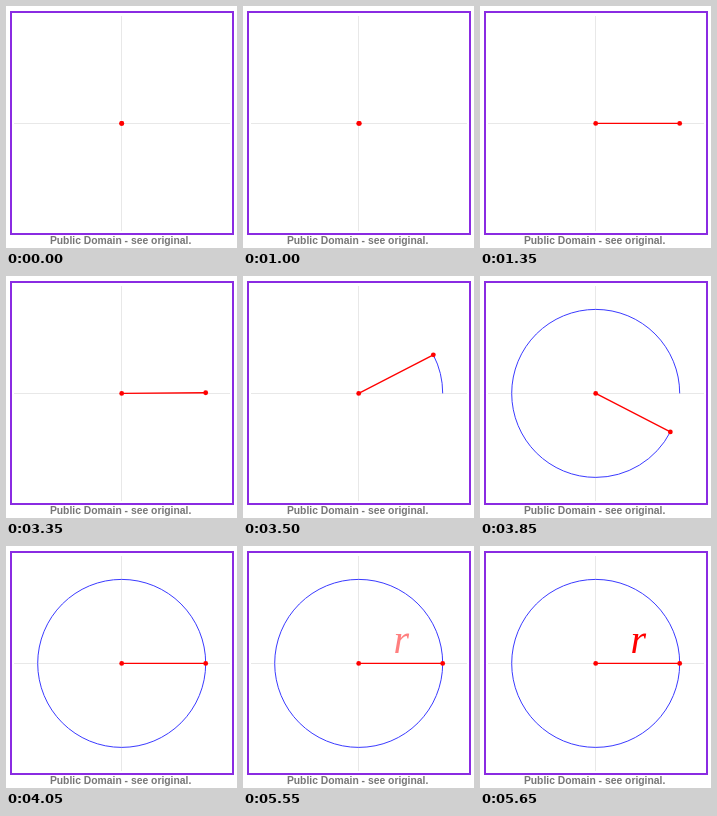
An HTML page with a canvas for the animation above (8000 ms loop, 231 by 242 pixels).

```html
<!DOCTYPE html>
<html lang="en">
<head>
<meta charset="utf-8">
<title>Circle and radius</title>
<style>
  html, body { margin: 0; width: 100%; height: 100%; overflow: hidden; background: #fff; }
  canvas { display: block; width: 231px; height: 242px; }
</style>
</head>
<body>
<canvas id="stage"></canvas>
<script>
const WIDTH = 231, HEIGHT = 242, LOOP = 8000, STEP = 50;
const CX = 115.7, CY = 117.4, RADIUS = 84;
const RED = '#ff0000', BLUE = '#3a3aff', PURPLE = '#8a2be2';

const canvas = document.getElementById('stage');
const scale = window.devicePixelRatio || 1;
canvas.width = Math.round(WIDTH * scale);
canvas.height = Math.round(HEIGHT * scale);
const ctx = canvas.getContext('2d');

const easeInOutCubic = t => t < 0.5 ? 4 * t ** 3 : 1 - 4 * (1 - t) ** 3;

// Eased progress that advances once per STEP, already moving at `start`.
function progress(time, start, steps) {
  const count = Math.floor((time - start) / STEP) + 1;
  return easeInOutCubic(Math.min(Math.max(count / steps, 0), 1));
}

function line(x1, y1, x2, y2, color, width) {
  ctx.beginPath();
  ctx.moveTo(x1, y1);
  ctx.lineTo(x2, y2);
  ctx.strokeStyle = color;
  ctx.lineWidth = width;
  ctx.stroke();
}

function dot(x, y) {
  ctx.beginPath();
  ctx.arc(x, y, 2.4, 0, Math.PI * 2);
  ctx.fillStyle = RED;
  ctx.fill();
}

function text(string, x, y, font, color, align) {
  ctx.font = font;
  ctx.textAlign = align;
  ctx.fillStyle = color;
  ctx.fillText(string, x, y);
}

function drawBackdrop() {
  ctx.fillStyle = '#fff';
  ctx.fillRect(0, 0, WIDTH, HEIGHT);
  line(8, 117.5, 224, 117.5, '#e8e8e8', 1);
  line(115.5, 10, 115.5, 225, '#e8e8e8', 1);
  ctx.strokeStyle = PURPLE;
  ctx.lineWidth = 2;
  ctx.strokeRect(5, 6, 222, 222);
  text('Public Domain - see original.', 114.6, 238,
    'bold 10.35px "Liberation Sans", Arial, sans-serif', '#777', 'center');
}

function draw(time) {
  const length = RADIUS * progress(time, 1000, 8);
  const angle = Math.PI * 2 * progress(time, 3350, 15);
  const x = CX + length * Math.cos(angle);
  const y = CY - length * Math.sin(angle);

  ctx.setTransform(scale, 0, 0, scale, 0, 0);
  drawBackdrop();

  if (angle > 0) {
    ctx.beginPath();
    ctx.arc(CX, CY, RADIUS, 0, -angle, true);
    ctx.strokeStyle = BLUE;
    ctx.lineWidth = 1;
    ctx.stroke();
  }
  if (length > 0) line(CX, CY, x, y, RED, 1.3);
  dot(CX, CY);
  dot(x, y);

  if (time >= 5550) {
    ctx.globalAlpha = time < 5650 ? 0.5 : 1;
    text('r', 150.6, 106.6, 'italic 40px "Liberation Serif", "Times New Roman", serif', RED, 'left');
    ctx.globalAlpha = 1;
  }
}

const start = performance.now();
function tick() {
  draw((performance.now() - start) % LOOP);
  requestAnimationFrame(tick);
}
tick();
</script>
</body>
</html>
```
